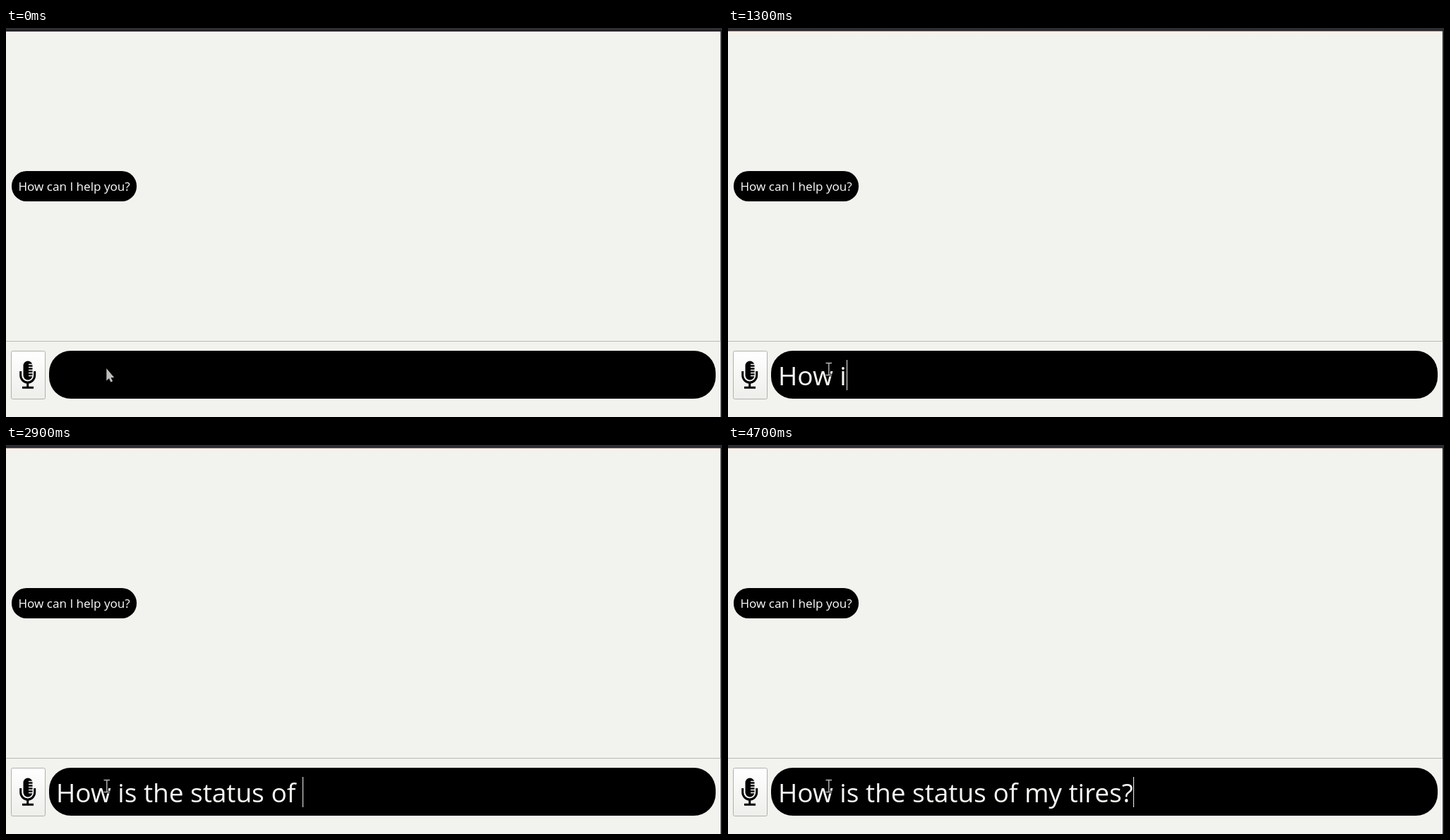
Write an HTML page that moves like this. It is 1014x552 px and loops after 8000 ms.

```html
<!DOCTYPE html>
<html lang="en">
<head>
<meta charset="utf-8">
<title>Assistant chat</title>
<style>
  html, body { margin: 0; width: 100%; height: 100%; overflow: hidden; background: #f2f3ee; }
  svg { display: block; width: 1014px; height: 552px; }
  text { font-family: "Open Sans", "Noto Sans", sans-serif; fill: #f7f8f4; white-space: pre; }
</style>
</head>
<body>
<svg viewBox="0 0 1014 552">
  <defs>
    <linearGradient id="face" x2="0" y2="1">
      <stop stop-color="#fff"/><stop offset="1" stop-color="#eeefeb"/>
    </linearGradient>
    <linearGradient id="glow" x2="0" y2="1">
      <stop id="tint" stop-color="#fbeff3"/><stop offset="1" stop-color="#f2f3ee"/>
    </linearGradient>
  </defs>

  <rect width="1014" height="552" fill="#f2f3ee"/>
  <rect y="4" width="1012" height="8" fill="url(#glow)"/>
  <rect y="444" width="1012" height="1" fill="#b9bab6"/>
  <rect x="1011" width="1" height="445" fill="#d2d3cf"/>
  <rect x="1012" width="2" height="552" fill="#2a2a2c"/>
  <rect width="1014" height="4" fill="#2e2d31"/>
  <rect id="edge" y="3" width="1014" height="2" fill="#242328"/>

  <rect x="8" y="203" width="177" height="43" rx="21"/>
  <text x="17.5" y="231" font-size="17.1" style="fill:#fff">How can I help you?</text>

  <rect x="7.5" y="458.5" width="48" height="68" rx="2" fill="url(#face)" stroke="#b0b1ad"/>
  <g fill="none" stroke="#000" stroke-width="3">
    <rect x="24.5" y="472.5" width="13" height="27" rx="6.5" fill="#000" stroke="none"/>
    <path d="M32 477.5h6m-6 4h6m-6 4h6m-6 4h6m-6 4h6" stroke="#f8f8f5" stroke-width="1.3"/>
    <path d="M20.7 487v6a10 10 0 0 0 20 0v-6M30.7 503v7M23 510.2h16"/>
  </g>

  <rect x="61" y="458" width="944" height="68" rx="31"/>
  <text id="typed" x="71" y="507" font-size="37"></text>
  <rect id="caret" y="471" width="1" height="43" fill="#f2f3ee"/>

  <path id="arrow" d="M142.3 483v17.5l3.6-3.3 2.5 5.3 2.7-1.3-2.5-5.2h4.6z" fill="#bdbebb"/>
  <g id="beam" fill="none">
    <path d="M138.5 475.5h8.5m-8.5 17h8.5m-4.2-17v17" stroke="#000" stroke-width="3.4"/>
    <path d="M138.5 475.5h8.5m-8.5 17h8.5m-4.2-17v17" stroke="#b9bab7" stroke-width="1.4"/>
  </g>
</svg>
<script>
const LOOP = 8000;
const FOCUS = 300;
const TYPE_START = 900;
const TICK = 100;
const TEXT_X = 71;

// Each "|" is one tick; an empty slot is a pause.
const STROKES = "H|ow| ||i|s| t|h|e| ||st|at|u||s| |o||f| |||m||y| ||t|i|re||s||||||?".split("|");

const [typed, caret, arrow, beam, tint, edge] =
  ["typed", "caret", "arrow", "beam", "tint", "edge"].map(id => document.getElementById(id));
const show = (el, on) => { el.style.visibility = on ? "visible" : "hidden"; };

function textAt(t) {
  const ticks = Math.floor((t - TYPE_START) / TICK) + 1;
  return STROKES.slice(0, Math.max(0, ticks)).join("");
}

function draw(t) {
  const focused = t >= FOCUS;
  const text = textAt(t);
  if (typed.textContent !== text) typed.textContent = text;
  const width = text ? typed.getComputedTextLength() : 0;
  caret.setAttribute("x", Math.round(TEXT_X + width));
  show(caret, focused);
  show(beam, focused);
  show(arrow, !focused);
  tint.setAttribute("stop-color", focused ? "#fdeee9" : "#fbeff3");
  edge.setAttribute("height", focused ? 1.5 : 2);
}

const start = performance.now();
function tick() {
  draw((performance.now() - start) % LOOP);
  requestAnimationFrame(tick);
}
tick();
</script>
</body>
</html>
```
